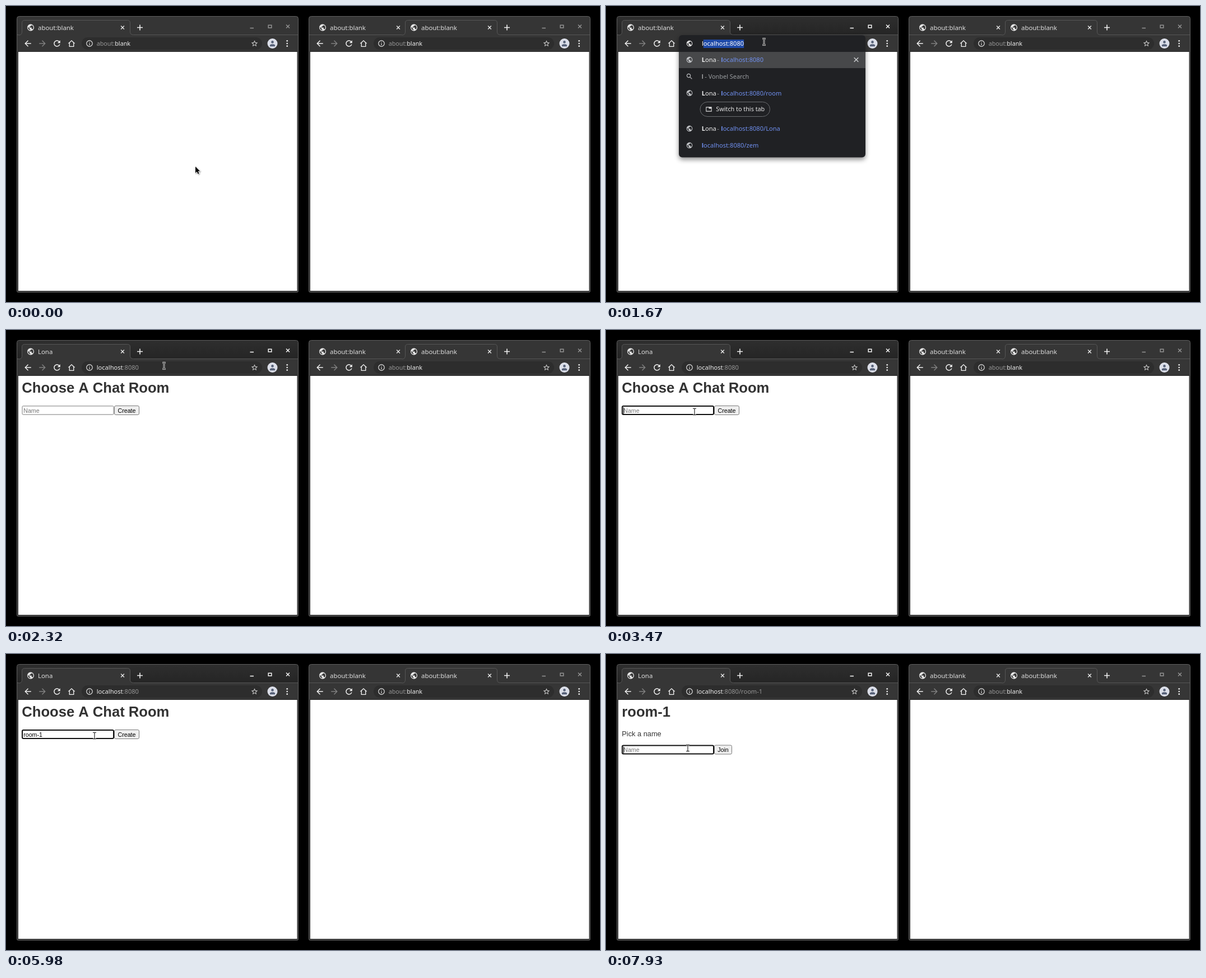
An HTML page with a canvas for the animation above (8 s loop, 1060 by 529 pixels).

```html
<!DOCTYPE html>
<html lang="en">
<head>
<meta charset="utf-8">
<title>Chat room demo</title>
<style>
html, body { margin: 0; width: 100%; height: 100%; overflow: hidden; background: #000; }
canvas { display: block; }
</style>
</head>
<body>
<canvas id="stage" width="1060" height="529"></canvas>
<script>
const ctx = document.getElementById('stage').getContext('2d');
const LOOP = 8000;
const UI = '"Noto Sans", sans-serif';
const PAGE = '"Liberation Sans", Arial, sans-serif';
const BLUE = '#7090f0', SELECT = '#1f4aa8', DIM = '#9a9da0';

// Icons on a 24 unit grid
const ICON = {
  globe: 'M12 2C6.48 2 2 6.48 2 12s4.48 10 10 10 10-4.48 10-10S17.52 2 12 2zm-1 17.93c-3.95-.49-7-3.85-7-7.93 0-.62.08-1.21.21-1.79L9 15v1c0 1.1.9 2 2 2v1.93zm6.9-2.54c-.26-.81-1-1.39-1.9-1.39h-1v-3c0-.55-.45-1-1-1H8v-2h2c.55 0 1-.45 1-1V7h2c1.1 0 2-.9 2-2v-.41c2.93 1.19 5 4.06 5 7.41 0 2.08-.8 3.97-2.1 5.39z',
  back: 'M20 11H7.83l5.59-5.59L12 4l-8 8 8 8 1.41-1.41L7.83 13H20v-2z',
  reload: 'M17.65 6.35C16.2 4.9 14.21 4 12 4c-4.42 0-8 3.58-8 8s3.58 8 8 8c3.73 0 6.84-2.55 7.73-6h-2.08c-.82 2.33-3.04 4-5.65 4-3.31 0-6-2.69-6-6s2.69-6 6-6c1.66 0 3.14.69 4.22 1.78L13 11h7V4l-2.35 2.35z',
  home: 'M12 3L2.5 12H5.5V21H18.5V12H21.5zM12 5.7L16.5 10V19H7.5V10z',
  star: 'M22 9.24l-7.19-.62L12 2 9.19 8.63 2 9.24l5.46 4.73L5.82 21 12 17.27 18.18 21l-1.63-7.03L22 9.24zM12 15.4l-3.76 2.27 1-4.28-3.32-2.88 4.38-.38L12 6.1l1.71 4.04 4.38.38-3.32 2.88 1 4.28L12 15.4z',
  info: 'M11 7h2v2h-2zm0 4h2v6h-2zm1-9C6.48 2 2 6.48 2 12s4.48 10 10 10 10-4.48 10-10S17.52 2 12 2zm0 18c-4.41 0-8-3.59-8-8s3.59-8 8-8 8 3.59 8 8-3.59 8-8 8z',
  search: 'M15.5 14h-.79l-.28-.27C15.41 12.59 16 11.11 16 9.5 16 5.91 13.09 3 9.5 3S3 5.91 3 9.5 5.91 16 9.5 16c1.61 0 3.09-.59 4.23-1.57l.27.28v.79l5 4.99L20.49 19l-4.99-5zm-6 0C7.01 14 5 11.99 5 9.5S7.01 5 9.5 5 14 7.01 14 9.5 11.99 14 9.5 14z',
  tab: 'M2 4H22V20H2zM4 6V18H20V10H12V6z'
};
for (const name in ICON) ICON[name] = new Path2D(ICON[name]);

// Pointer stops: time, x, y, shape
const POINTER = [
  [0, 338, 287, 'arrow'], [400, 318, 243, 'arrow'], [490, 262, 150, 'arrow'],
  [590, 215, 88, 'arrow'], [680, 209, 68, 'beam'], [780, 282, 64, 'beam'],
  [2990, 276, 72, 'beam'], [3060, 252, 88, 'arrow'], [3130, 220, 106, 'beam'],
  [3210, 188, 126, 'arrow'], [3290, 166, 141, 'beam'], [3370, 158, 146, 'beam'],
  [6270, 182, 148, 'beam'], [6340, 210, 150, 'arrow'], [6410, 222, 151, 'arrow'],
  [7350, 196, 158, 'arrow'], [7440, 160, 166, 'beam'], [7540, 146, 168, 'beam']
];
const TYPED_URL = [[1670, 'l'], [1740, 'lo'], [2060, 'loc']];
const TYPED_ROOM = [[0, ''], [4090, 'r'], [4470, 'roo'], [4880, 'room'], [5060, 'room-'], [5380, 'room-1']];

const latest = (list, t) => list.filter(item => item[0] <= t).pop();

function icon(name, x, y, scale, color = '#e8e8e8', flip = false) {
  ctx.save();
  ctx.translate(x, y);
  ctx.scale(flip ? -scale : scale, scale);
  ctx.translate(-12, -12);
  ctx.fillStyle = color;
  ctx.fill(ICON[name], 'evenodd');
  ctx.restore();
}

function text(str, x, y, color, size, family = UI, weight = 400) {
  ctx.font = `${weight} ${size}px ${family}`;
  ctx.fillStyle = color;
  ctx.fillText(str, x, y);
  return x + ctx.measureText(str).width;
}

function rect(x, y, w, h, color) {
  ctx.fillStyle = color;
  ctx.fillRect(x, y, w, h);
}

function box(x, y, w, h, r, fill, stroke, line = 1) {
  ctx.beginPath();
  ctx.roundRect(x, y, w, h, r);
  if (fill) { ctx.fillStyle = fill; ctx.fill(); }
  if (stroke) { ctx.strokeStyle = stroke; ctx.lineWidth = line; ctx.stroke(); }
}

function disc(x, y, r, color) {
  ctx.beginPath();
  ctx.arc(x, y, r, 0, 7);
  ctx.fillStyle = color;
  ctx.fill();
}

function strokePath(d, color, line) {
  ctx.strokeStyle = color;
  ctx.lineWidth = line;
  ctx.stroke(new Path2D(d));
}

const cross = (x, y, r, color, line) =>
  strokePath(`M${x - r} ${y - r}L${x + r} ${y + r}M${x - r} ${y + r}L${x + r} ${y - r}`, color, line);

function tabLabel(left, right, title, favicon) {
  if (favicon) icon('globe', left + 16, 38.5, .6);
  text(title, left + 29, 42.5, '#dedede', 11.4);
  cross(right - 13, 38.5, 2.9, '#e4e4e4', 1.4);
}

function browser(dx, focused, tabs, loading) {
  ctx.save();
  ctx.translate(dx, 0);
  box(19.5, 18.5, 502, 493, [4, 4, 2, 2], '#353535', '#606060');
  if (focused) {
    const shade = ctx.createLinearGradient(0, 19, 0, 52);
    shade.addColorStop(0, '#2e2e2e');
    shade.addColorStop(1, '#252525');
    box(20, 19, 501, 33, [4, 4, 0, 0], shade);
  }
  const active = tabs[tabs.length - 1];
  const l = active.left + .5, r = active.right + .5;
  const outline = `M${l - 6} 52Q${l} 52 ${l} 46V30Q${l} 25.5 ${l + 5} 25.5H${r - 5}Q${r} 25.5 ${r} 30V46Q${r} 51.5 ${r + 6} 51.5`;
  ctx.fillStyle = '#363636';
  ctx.fill(new Path2D(outline + 'V53H' + (l - 6)));
  rect(20, 52, 501, 30, '#363636');
  strokePath(`M20 51.5H${l - 6}` + outline.replace('M', 'L') + 'H521', '#565656', 1);
  for (const tab of tabs) tabLabel(tab.left, tab.right, tab.title, !loading);
  const plus = active.right + 18;
  strokePath(`M${plus - 5} 38.5H${plus + 5}M${plus} 33.5V43.5`, '#f0f0f0', 1.6);

  const control = focused ? '#f4f4f4' : '#929292';
  strokePath('M435.5 39.5H442', control, 1.6);
  strokePath('M468.2 34.2H473.8V39H468.2Z', control, 1.5);
  cross(503, 36.5, 3, control, 1.5);

  icon('back', 39, 67, .72, '#f0f0f0');
  icon('back', 65, 67, .72, '#808080', true);
  if (loading) cross(91, 67, 4.3, '#f0f0f0', 1.6);
  else icon('reload', 91, 67, .72, '#f0f0f0');
  icon('home', 117, 67, .68, '#f0f0f0');
  disc(475.5, 67, 9, '#dcdfe9');
  disc(475.5, 64.4, 2.3, '#566178');
  box(470.8, 68.2, 9.4, 4, [4, 4, 1, 1], '#566178');
  for (const y of [62.3, 67, 71.7]) disc(501.7, y, 1.35, '#f0f0f0');

  rect(20, 81, 501, 1, '#292929');
  rect(22, 82, 497.5, 427, '#fff');
  ctx.restore();
}

function addressBar(dx, parts, focus = 0) {
  ctx.save();
  ctx.translate(dx, 0);
  box(135, 56, 322, 22, 11, focus ? '#222326' : '#2d2d2d');
  if (focus) {
    ctx.globalAlpha = focus;
    box(135, 56, 322.5, 22, 11, null, '#2450b4', 2);
    ctx.globalAlpha = 1;
  }
  icon('info', 149, 67, .575);
  icon('star', 443.5, 67, .575, '#d5d5d5');
  let x = 161.7;
  for (const [str, color, size] of parts) x = text(str, x, 71, color, size);
  ctx.restore();
  return x;
}

// Label whose leading letters are bold where they match the query
function match(str, query, x, y, color) {
  const hit = str.toLowerCase().startsWith(query) ? query.length : 0;
  x = text(str.slice(0, hit), x, y, color, 11, UI, 700);
  return text(str.slice(hit), x, y, color, 11.1);
}

function suggestions(query, closing) {
  const top = closing ? 82 : 52;
  ctx.save();
  ctx.globalAlpha = closing ? .86 : 1;
  ctx.save();
  ctx.shadowColor = 'rgba(0,0,0,.45)';
  ctx.shadowBlur = 9;
  ctx.shadowOffsetY = 4;
  if (closing) {
    ctx.beginPath();
    ctx.rect(110, 82, 380, 220);
    ctx.clip();
  }
  box(130, top, 333, 270.5 - top, closing ? [0, 0, 6, 6] : 6, '#202124');
  ctx.restore();
  rect(130, 82, 333, 29, '#47484a');
  if (closing) ctx.globalAlpha = .95;
  cross(446.5, 96, 3.8, '#d0d2d4', 1.3);

  const rows = [[100, 'localhost:8080'], [159.5, 'localhost:8080/room'], [223, 'localhost:8080/Lona']];
  for (const [y, url] of rows) {
    icon('globe', 149, y - 4, .53, '#c0c2c5');
    match('Lona', query, 170.7, y, '#f0f0f0');
    text('-', 198.3, y, DIM, 11);
    match(url, query, 205.3, y, BLUE);
  }
  icon('search', 149, 126, .57, '#c0c2c5');
  const end = text(query, 170.7, 129.8, '#f0f0f0', 11);
  text(' - Vonbel Search', end, 129.8, DIM, 10.9);
  icon('globe', 149, 249, .53, '#c0c2c5');
  match('localhost:8080/zem', query, 170.7, 253, BLUE);
  box(168, 171.5, 124.5, 26, 13, null, '#6b6d70');
  icon('tab', 183.5, 184.5, .52, '#e0e0e0');
  text('Switch to this tab', 196.3, 188.3, '#e8e8e8', 10.8);
  ctx.restore();

  if (closing) return;
  icon('globe', 149, 67, .53, '#e0e0e0');
  const x = text(query, 170.9, 71, '#fff', 11.1);
  const rest = 'localhost:8080'.slice(query.length);
  rect(x, 60, ctx.measureText(rest).width, 15, SELECT);
  text(rest, x, 71, '#fff', 11.1);
}

function form(y, label, buttonWidth, { value = '', focus, caret, hover, buttonHover }) {
  if (focus) box(29, y + 1, 163, 15, 2, '#fff', '#101010', 2);
  else box(29, y + .9, 163, 15.2, 1.5, '#fff', hover ? '#505050' : '#7a7a7a');
  const end = text(value || 'Name', 31.2, y + 12.6, value ? '#000' : '#757575', 10.67, PAGE);
  if (caret) rect(value ? Math.round(end - .3) : 31, y + 3, 1, 12, '#000');
  box(193.5, y + .5, buttonWidth - 1, 16, 2.4, buttonHover ? '#e5e5e5' : '#efefef', buttonHover ? '#505050' : '#7a7a7a');
  ctx.textAlign = 'center';
  text(label, 193 + buttonWidth / 2, y + 12.6, '#000', 10.67, PAGE);
  ctx.textAlign = 'left';
}

const heading = str => text(str, 28.3, 112, '#333', 25.6, PAGE, 700);

function page(t) {
  if (t < 6960) {
    heading('Choose A Chat Room');
    const focus = t >= 3470 && t < 6840;
    form(135, 'Create', 45, {
      value: latest(TYPED_ROOM, t)[1],
      focus,
      caret: focus && (t < 5980 || t >= 6500),
      hover: t >= 3290 && t < 6340,
      buttonHover: t >= 6340
    });
  } else {
    heading('room-1');
    text('Pick a name', 28.3, 146.8, '#333', 12.8, PAGE);
    form(162.5, 'Join', 32, { focus: t >= 7930, caret: t >= 7930, hover: t >= 7440 });
  }
}

function pointer(x, y, shape) {
  ctx.save();
  ctx.translate(x, y);
  ctx.lineJoin = 'round';
  if (shape === 'arrow') {
    const arrow = new Path2D('M0 0V11.5L2.7 9L4.6 13.2L6.5 12.3L4.7 8.2H8.2Z');
    ctx.shadowColor = 'rgba(0,0,0,.4)';
    ctx.shadowBlur = 2;
    ctx.shadowOffsetX = ctx.shadowOffsetY = 1;
    ctx.strokeStyle = '#fff';
    ctx.lineWidth = 1.6;
    ctx.stroke(arrow);
    ctx.shadowColor = 'transparent';
    ctx.fillStyle = '#000';
    ctx.fill(arrow);
  } else {
    const beam = 'M-3 -5.7H-1Q0 -5.7 0 -4.7V4.7Q0 5.7 -1 5.7H-3M3 -5.7H1Q0 -5.7 0 -4.7M0 4.7Q0 5.7 1 5.7H3';
    strokePath(beam, '#fff', 2.6);
    strokePath(beam, '#111', 1.1);
  }
  ctx.restore();
}

function leftAddress(t) {
  if (t >= 2250) {
    const path = t >= 6960 ? '/room-1' : '';
    addressBar(0, [['localhost', '#eee', 11.1], [':8080' + path, '#969696', 11.1]]);
  } else if (t >= 920) {
    const end = addressBar(0, [['about:blank', '#fff', 10.75]], t < 970 ? .5 : 1);
    if (t >= 1150) {
      rect(161.7, 60, end - 161.7, 15, SELECT);
      text('about:blank', 161.7, 71, '#fff', 10.75);
    } else rect(Math.round(end) - 1, 61, 1, 13, '#fff');
  } else blankAddress(0);
}

const blankAddress = dx =>
  addressBar(dx, [['about:', '#969696', 10.75], ['blank', '#eee', 10.75]]);

function draw(t) {
  rect(0, 0, 1060, 529, '#000');
  const loading = t >= 2250 && t < 2320;
  const loaded = t >= 2320;
  browser(0, t >= 90, [{ left: 28, right: 221, title: loaded ? 'Lona' : 'about:blank' }], loading);
  browser(521, false, [
    { left: 28, right: 192, title: 'about:blank' },
    { left: 191, right: 355, title: 'about:blank' }
  ], false);
  leftAddress(t);
  blankAddress(521);
  if (loaded) page(t);
  else if (t >= 1670) suggestions(latest(TYPED_URL, t)[1], loading);
  const [, x, y, shape] = latest(POINTER, t);
  pointer(x, y, shape);
}

function tick() {
  draw(performance.now() % LOOP);
  requestAnimationFrame(tick);
}
tick();
</script>
</body>
</html>
```
